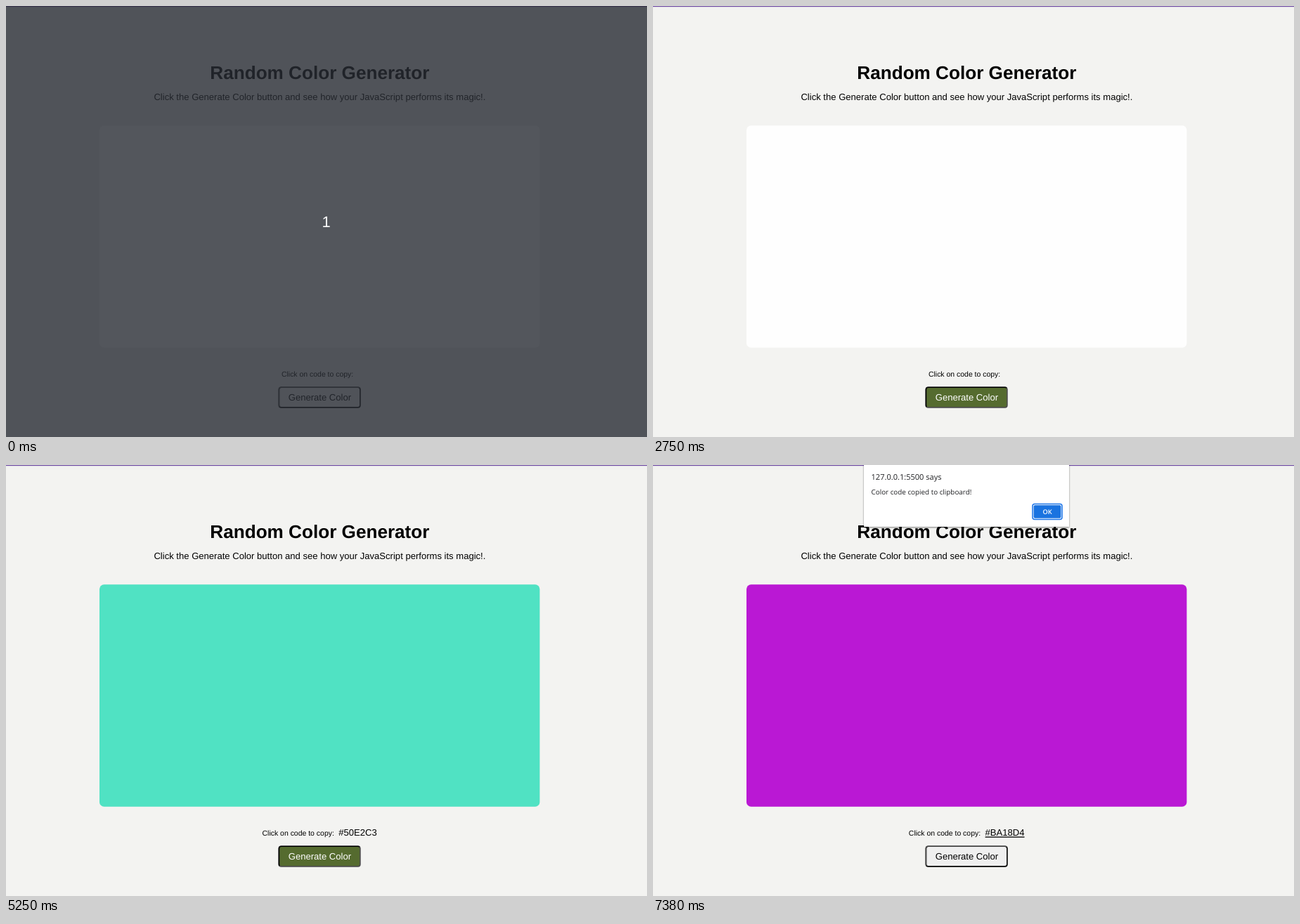
An HTML page that plays this animation: 912x614 px, repeating every 8 s.

```html
<!DOCTYPE html>
<html lang="en">
<head>
<meta charset="utf-8">
<title>Random Color Generator</title>
<style>
  html, body { margin: 0; width: 100%; height: 100%; overflow: hidden; background: #f3f3f1; }
  svg { display: block; width: 100%; height: 100%; }
  text { font-family: "Liberation Sans", Arial, sans-serif; font-size: 13.07px; text-rendering: geometricPrecision; }
  .mid { text-anchor: middle; }
  #title { font-size: 26.13px; font-weight: bold; }
  #label { font-size: 10.46px; }
  #code { font-size: 13.07px; }
  #count { font-size: 22px; fill: #fff; }
  #dialog text { font-family: "Open Sans", "Noto Sans", sans-serif; fill: #202124; }
  #dialog .head { font-size: 11.05px; }
  #dialog .body { font-size: 9.85px; }
  #dialog .ok { font-size: 9.2px; font-weight: 600; fill: #fff; }
</style>
</head>
<body>
<svg viewBox="0 0 912 614" preserveAspectRatio="none">
  <defs>
    <clipPath id="topLeft"><path d="M387 573V542H505L490 557.5H402Z"/></clipPath>
    <filter id="shadow" x="-5%" y="-10%" width="110%" height="125%">
      <feDropShadow dx="0" dy="1" stdDeviation="1.3" flood-color="#000" flood-opacity=".5"/>
    </filter>
    <rect id="edge" x="388.4" y="543.3" width="115.5" height="28.6" rx="3.2"/>
  </defs>

  <rect width="912" height="614" fill="#f3f3f1"/>
  <rect width="912" height="1.2" fill="#6f4ca3"/>
  <text id="title" class="mid" x="446.4" y="104">Random Color Generator</text>
  <text class="mid" x="446.4" y="134.3">Click the Generate Color button and see how your JavaScript performs its magic!.</text>
  <rect id="swatch" x="133" y="170.2" width="626.4" height="316.6" rx="6.6"/>
  <text id="label" class="mid" y="528.4">Click on code to copy:<tspan id="code" dx="6.5"></tspan></text>

  <g stroke-width="1.63">
    <use id="face" href="#edge"/>
    <use id="low" href="#edge" fill="none"/>
    <g clip-path="url(#topLeft)"><use id="high" href="#edge" fill="none"/></g>
  </g>
  <text id="caption" class="mid" x="446.4" y="561.7">Generate Color</text>

  <g id="dialog">
    <rect x="300" y="-6" width="292" height="94" fill="#fff" filter="url(#shadow)"/>
    <text class="head" x="310.5" y="21.2">127.0.0.1:5500 says</text>
    <text class="body" x="310.5" y="41.6">Color code copied to clipboard!</text>
    <rect x="540" y="55.6" width="42" height="21.8" rx="3" fill="#fff" stroke="#1a73e8" stroke-width="1.5"/>
    <rect x="541.6" y="57.2" width="38.8" height="18.6" rx="1.8" fill="#1a73e0"/>
    <text class="ok mid" x="561" y="69.8">OK</text>
  </g>

  <g id="cover">
    <rect width="912" height="614" fill="#282c34" opacity=".8"/>
    <text id="count" class="mid" x="455.6" y="314.6">1</text>
  </g>
</svg>
<script>
const LOOP = 8000, STEP = 125, FADE = 400;
const $ = id => document.getElementById(id);
const set = (id, name, value) => $(id).setAttribute(name, value);
const show = (id, on) => set(id, "display", on ? "inline" : "none");
const within = (t, a, b) => t >= a && t < b;
const mix = (a, b, k) => `rgb(${a.map((v, i) => Math.round(v + (b[i] - v) * k))})`;

const GREY = [239, 239, 239], OLIVE = [85, 107, 47];
const BLACK = [0, 0, 0], WHITE = [255, 255, 255];

// CSS "ease" curve, solved by bisection
function ease(x) {
  if (x >= 1) return 1;
  let lo = 0, hi = 1;
  const curve = (p, a, b) => 3 * a * p * (1 - p) ** 2 + 3 * b * p * p * (1 - p) + p ** 3;
  for (let i = 0; i < 24; i++) {
    const p = (lo + hi) / 2;
    if (curve(p, .25, .25) < x) lo = p; else hi = p;
  }
  return curve(lo, .1, 1);
}

// Hover fades in by steps and ends at once
function hover(t) {
  const start = within(t, 1130, 4250) ? 1130 : within(t, 4880, 6000) ? 4880 : null;
  if (start === null) return 0;
  const step = Math.floor(t / STEP) - Math.floor(start / STEP);
  return ease((step * STEP + 60) / FADE);
}

function draw(t) {
  const color = t < 3000 ? "" : t < 5380 ? "#50E2C3" : "#BA18D4";
  const underlined = within(t, 4630, 4880) || t >= 6000;
  const pressed = within(t, 2750, 3000) || within(t, 5250, 5380);
  const k = hover(t);

  set("swatch", "fill", color || "#fefefe");
  set("label", "x", color ? 446.2 : 443.1);
  if ($("code").textContent !== color) $("code").textContent = color;
  set("code", "text-decoration", underlined ? "underline" : "none");

  set("face", "fill", mix(GREY, OLIVE, k));
  set("caption", "fill", mix(BLACK, WHITE, k));
  set("low", "stroke", pressed ? "#4c4c4c" : "#000");
  set("high", "stroke", pressed ? "#000" : "#4c4c4c");

  show("cover", t < 130);
  show("dialog", t >= 7250);
  set("dialog", "opacity", t < 7380 ? .5 : 1);
}

const begin = performance.now();
function tick() {
  draw((performance.now() - begin) % LOOP);
  requestAnimationFrame(tick);
}
tick();
</script>
</body>
</html>
```
